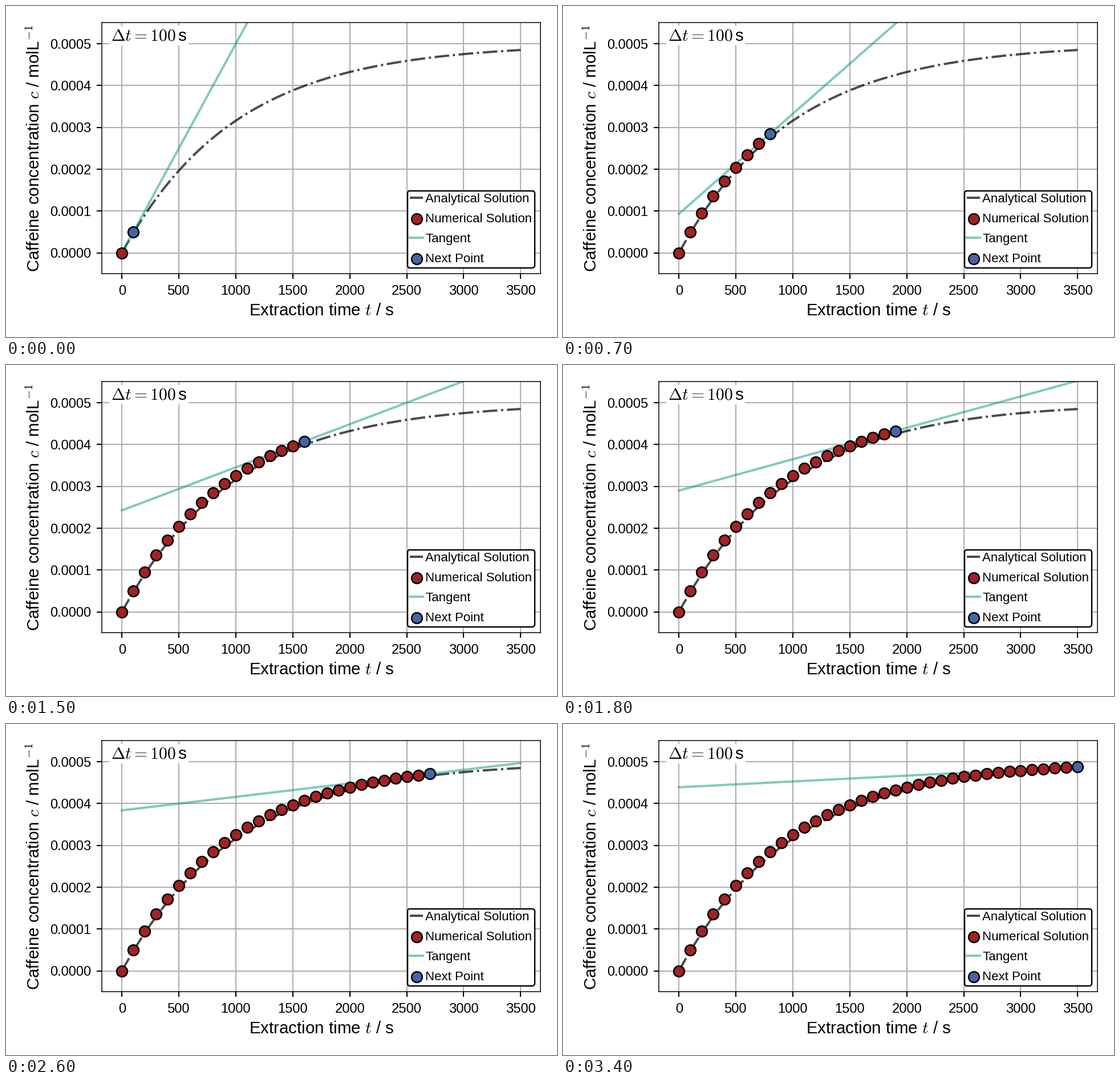
These frames come from a looping animation (966x580 px, 3500 ms). A matplotlib script:

```python
import numpy as np
import matplotlib.pyplot as plt
from matplotlib.animation import FuncAnimation
from matplotlib.ticker import FormatStrFormatter

W, H, DPI = 966, 580, 200
LEFT, RIGHT, TOP, BOTTOM = 168.3, 937.3, 29.35, 469.35

GREEN, RED, BLUE = "#009682", "#a22223", "#4664aa"

C_MAX, K, DT, T_END = 5e-4, 1e-3, 100, 3500
STEPS = T_END // DT


def pt(px):
    """Pixels to points."""
    return px * 72 / DPI


plt.rcParams.update({
    "font.family": "Liberation Sans",
    "mathtext.fontset": "cm",
    "axes.linewidth": pt(1.5),
    "axes.unicode_minus": False,
})

# Explicit Euler for dc/dt = K (C_MAX - c)
t = np.arange(STEPS + 1) * DT
c = np.zeros(STEPS + 1)
for n in range(STEPS):
    c[n + 1] = c[n] + DT * K * (C_MAX - c[n])

fig = plt.figure(figsize=(W / DPI, H / DPI), dpi=DPI, facecolor="white")
ax = fig.add_axes([LEFT / W, 1 - BOTTOM / H,
                   (RIGHT - LEFT) / W, (BOTTOM - TOP) / H])
ax.set_axisbelow(True)
ax.grid(color="#b0b0b0", lw=pt(2.1))
ax.tick_params(labelsize=pt(23.8), length=pt(8.9), width=pt(2.1), pad=pt(10.4))
ax.set_xticks(np.arange(0, T_END + 1, 500))
ax.set_yticks(np.arange(6) * 1e-4)
ax.yaxis.set_major_formatter(FormatStrFormatter("%.4f"))

LINE = pt(4)
fine_t = np.linspace(0, T_END, 1000)
exact, = ax.plot(fine_t, C_MAX * (1 - np.exp(-K * fine_t)), "-.",
                 color="black", alpha=0.7, lw=LINE)
tangent, = ax.plot([], [], color=GREEN, alpha=0.5, lw=LINE)


def dots(color, z):
    return ax.scatter([0], [0], s=pt(18.7) ** 2, c=color,
                      edgecolors="black", linewidths=pt(2.6), zorder=z)


done = dots(RED, 3)
ahead = dots(BLUE, 4)

ax.set_xlim(-0.05 * T_END, 1.05 * T_END)
ax.set_ylim(-5e-5, 5.5e-4)

LABEL = pt(29.6)
ax.text(0.02, 0.98, r"$\Delta t = 100\,$s", transform=ax.transAxes,
        size=LABEL, va="top", zorder=3,
        bbox=dict(fc="white", ec="none", pad=pt(3)))
fig.text((LEFT + RIGHT) / 2 / W, 1 - 542.5 / H, "Extraction time $t$ / s",
         size=LABEL, ha="center", va="baseline")
fig.text(58.7 / W, 1 - (TOP + BOTTOM) / 2 / H,
         "Caffeine concentration $c$ / molL$^{-1}$", size=LABEL,
         ha="center", va="baseline", rotation=90, rotation_mode="anchor")

legend = ax.legend(
    [exact, done, tangent, ahead],
    ["Analytical Solution", "Numerical Solution", "Tangent", "Next Point"],
    loc="lower right", fontsize=pt(22.3), framealpha=1, edgecolor="black",
    borderpad=0.2, borderaxespad=0.48, handlelength=1, handletextpad=0.2,
    labelspacing=0.63, scatterpoints=1)
legend.get_frame().set_linewidth(pt(2.4))
legend.set_zorder(6)


def update(n):
    slope = K * (C_MAX - c[n])
    ends = np.array([0, T_END])
    tangent.set_data(ends, c[n] + slope * (ends - t[n]))
    done.set_offsets(np.column_stack([t[:n + 1], c[:n + 1]]))
    ahead.set_offsets([[t[n + 1], c[n + 1]]])
    return tangent, done, ahead


anim = FuncAnimation(fig, update, frames=STEPS, interval=100,
                     init_func=lambda: update(0), repeat=True, repeat_delay=0)
plt.show()
```
